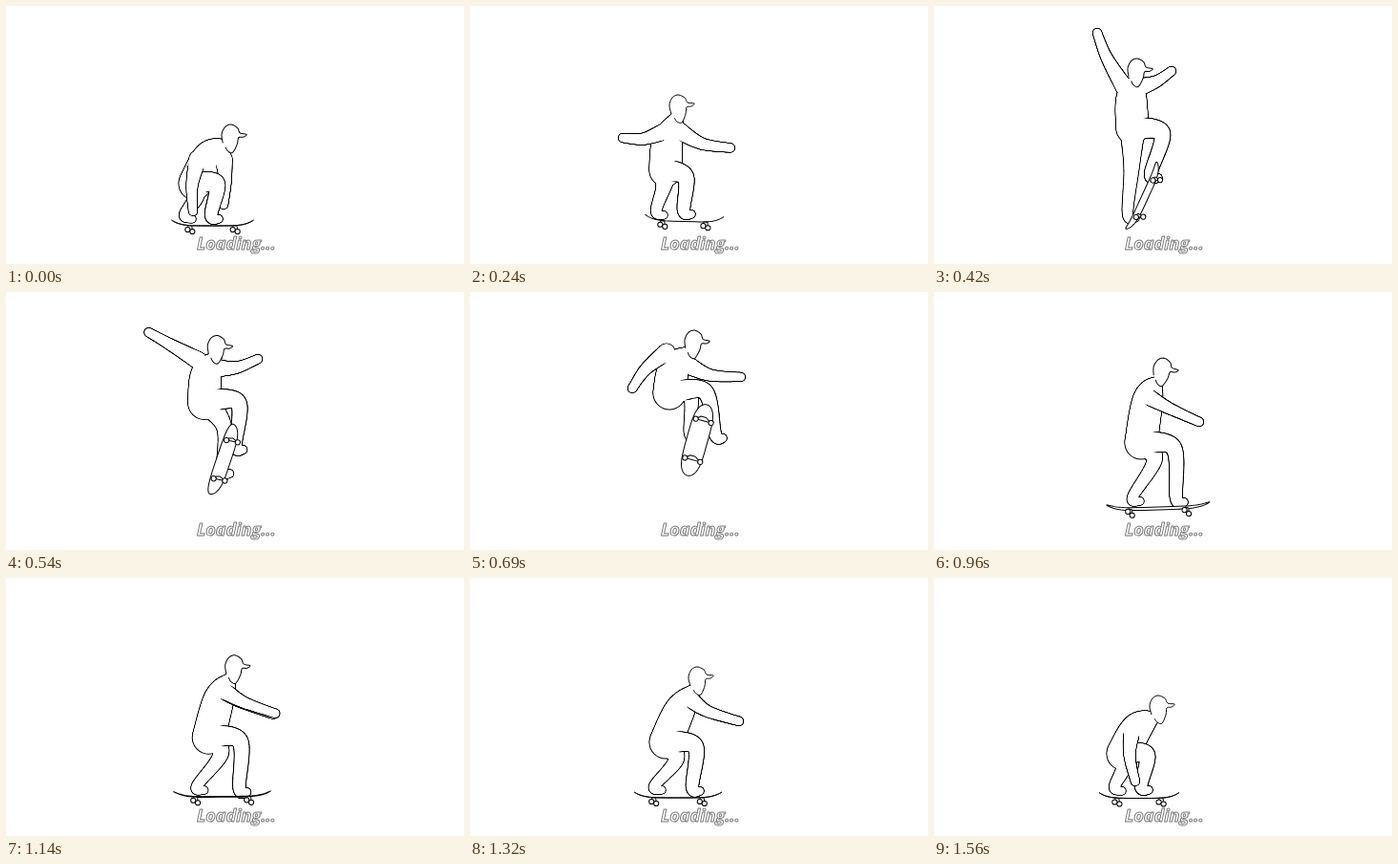
Animation, 480 px wide and 270 px high, one loop 1.59 s. Source, as an HTML page with a canvas:

```html
<!DOCTYPE html>
<html lang="en">
<head>
<meta charset="utf-8">
<title>Loading</title>
<style>
html, body { margin: 0; width: 100%; height: 100%; overflow: hidden; background: #fff; }
canvas { display: block; width: 480px; height: 270px; }
</style>
</head>
<body>
<canvas id="stage" width="480" height="270"></canvas>
<script>
const ctx = document.getElementById('stage').getContext('2d');
const LOOP = 1590, STEP = 30, TAU = Math.PI * 2;

// Half thickness at each joint; a near limb is outlined only past its seam.
const LIMBS = {
  torso: { radii: [6, 15.5, 17] },
  rearLeg: { radii: [13, 8, 5.5, 4] },
  frontArm: { radii: [9, 6, 4.5], seam: 0.2 },
  frontLeg: { radii: [12, 8.5, 6.5, 4], seam: 0.16 },
  backArm: { radii: [9, 6, 4.5], seam: 0.2 }
};
const FOOT = [0.45, 9];

// Joints as x, y. torso: neck, chest, hip. Arms: shoulder, elbow, hand.
// Legs: knee, ankle. head: x, y, tilt. board: x, y, angle, half length, half width.
const poses = [
  { time: 0, head: [235, 135, 0.08], torso: [230,146, 213,157, 198,186],
    backArm: [201,160, 195,188, 196,215], frontArm: [228,160, 230,184, 228,208],
    rearLeg: [198,202, 187,219], frontLeg: [221,186, 215,219], board: [216.5, 230, 0, 43, 0] },
  { time: 240, head: [218, 104, 0], torso: [217,116, 207,141, 205,172],
    backArm: [207,130, 182,139, 160,138], frontArm: [218,130, 243,144, 273,148.5],
    rearLeg: [203,189, 195,215], frontLeg: [226,179, 224,214], board: [224.5, 225.5, 0.03, 41, 0] },
  { time: 420, head: [212, 66, 0.1], torso: [213,78, 207,96, 208,128],
    backArm: [200,86, 181,54, 171,28], frontArm: [215,85, 233,79, 249,68],
    rearLeg: [207,170, 203,218], frontLeg: [239,133, 227,176], board: [221, 200, -1.14, 38.5, 3.5] },
  { time: 690, head: [234, 51, 0.14], torso: [230,63, 214,79, 209,106],
    backArm: [206,63, 184,81, 170,101], frontArm: [229,77, 252,87, 284,89],
    rearLeg: [231,108, 230,148], frontLeg: [246,104, 257,149], board: [238, 155, -1.3, 38.5, 11] },
  { time: 960, head: [239, 80, 0.22], torso: [232,95, 224,113, 217,158],
    backArm: [220,107, 245,121, 278,136], frontArm: [220,107, 245,121, 278,136],
    rearLeg: [231,176, 208,215], frontLeg: [251,163, 254,216], board: [235, 226.5, -0.03, 54, 1.5] },
  { time: 1320, head: [238, 104, 0], torso: [235,117, 220,138, 205,172],
    backArm: [229,125, 248,139, 282,150], frontArm: [229,125, 248,139, 282,150],
    rearLeg: [216,190, 193,218], frontLeg: [236,176, 233,219], board: [218, 230, 0, 46, 0] },
  { time: 1560, head: [235, 134, 0], torso: [230,146, 213,157, 198,184],
    backArm: [208,156, 205,185, 211,213], frontArm: [208,156, 205,185, 211,213],
    rearLeg: [199,198, 189,219], frontLeg: [223,185, 217,218], board: [215, 230.5, 0, 42, 0] }
];

// Turns joints into a root plus angle, length pairs, so that limbs swing.
const CUT = 1.7;
const toBones = p => p.map((v, i) => {
  if (i < 2) return v;
  const j = i & ~1, dx = p[j] - p[j - 2], dy = p[j + 1] - p[j - 1];
  return i % 2 ? Math.hypot(dx, dy) : (Math.atan2(dy, dx) + CUT + TAU) % TAU - CUT;
});

function toJoints(bones) {
  const joints = [[bones[0], bones[1]]];
  for (let i = 2; i < bones.length; i += 2) {
    const [x, y] = joints[joints.length - 1];
    joints.push([x + bones[i + 1] * Math.cos(bones[i]), y + bones[i + 1] * Math.sin(bones[i])]);
  }
  return joints;
}

for (const pose of poses) {
  const hip = pose.torso.slice(4);
  for (const leg of ['rearLeg', 'frontLeg']) pose[leg] = [...toBones([...hip, ...pose[leg]]), ...FOOT];
  for (const part of ['torso', 'backArm', 'frontArm']) pose[part] = toBones(pose[part]);
}

const slope = (part, i, a, b) => (poses[b][part][i] - poses[a][part][i]) / (poses[b].time - poses[a].time);

// Smooth slope at a pose that never overshoots its neighbours.
function tangent(part, i, k) {
  const last = poses.length - 1;
  if (k === 0) return slope(part, i, 0, 1);
  if (k === last) return slope(part, i, last - 1, last);
  const before = slope(part, i, k - 1, k), after = slope(part, i, k, k + 1);
  return before * after > 0 ? 2 * before * after / (before + after) : 0;
}

function partAt(part, t) {
  let k = poses.length - 2;
  while (k > 0 && poses[k].time > t) k--;
  const span = poses[k + 1].time - poses[k].time;
  const u = (t - poses[k].time) / span, v = 1 - u;
  return poses[k][part].map((a, i) =>
    a * v * v * (1 + 2 * u) + poses[k + 1][part][i] * u * u * (3 - 2 * u) +
    span * u * v * (tangent(part, i, k) * v - tangent(part, i, k + 1) * u));
}

// Catmull-Rom through a list of points of any dimension, u from 0 to 1.
function along(points, u) {
  const last = points.length - 1;
  const i = Math.min(last - 1, Math.floor(u * last)), s = u * last - i;
  const [a, b, c, d] = [-1, 0, 1, 2].map(o => points[Math.min(last, Math.max(0, i + o))]);
  return b.map((_, n) => b[n] + s / 2 * (c[n] - a[n] +
    s * (2 * a[n] - 5 * b[n] + 4 * c[n] - d[n] + s * (3 * (b[n] - c[n]) + d[n] - a[n]))));
}

function disc(x, y, r, color) {
  ctx.fillStyle = color;
  ctx.beginPath();
  ctx.arc(x, y, r, 0, TAU);
  ctx.fill();
}

function sweep(limb, color, grow, from = 0) {
  for (let u = from; u <= 1; u += 1 / 90) {
    const [x, y, r] = along(limb, u);
    disc(x, y, r + grow, color);
  }
}

function trace(points, closed) {
  ctx.beginPath();
  for (const [x, y] of points) ctx.lineTo(x, y);
  if (closed) ctx.closePath();
  ctx.fillStyle = '#fff';
  ctx.fill();
  ctx.stroke();
}

function drawBody(t) {
  const limbs = {};
  for (const [name, { radii }] of Object.entries(LIMBS)) {
    limbs[name] = toJoints(partAt(name, t)).map((joint, i) => [...joint, radii[i]]);
  }
  // One silhouette first, then the near limbs over it.
  for (const limb of Object.values(limbs)) sweep(limb, '#000', 0.5);
  for (const limb of Object.values(limbs)) sweep(limb, '#fff', -0.5);
  for (const [name, { seam }] of Object.entries(LIMBS)) {
    if (!seam) continue;
    sweep(limbs[name], '#000', 0.5, seam);
    sweep(limbs[name], '#fff', -0.5);
  }
}

// Nape, capped crown, brim, face and chin.
const PROFILE = [[-7, 9], [-9, 0], [-6, -8], [0, -11], [7, -8], [10, -3],
  [17, -2], [14, 1], [9, 2], [8, 9], [4, 18], [-1, 17], [-4, 13]];

function drawHead(t) {
  const [x, y, tilt] = partAt('head', t);
  ctx.save();
  ctx.translate(x, y);
  ctx.rotate(tilt);
  trace(Array.from({ length: 73 }, (_, i) => along(PROFILE, i / 72)));
  ctx.restore();
}

function drawBoard(t) {
  const [x, y, angle, half, width] = partAt('board', t);
  const flat = 1 - width / 11;
  ctx.save();
  ctx.translate(x, y);
  ctx.rotate(angle);
  trace(Array.from({ length: 81 }, (_, i) => {
    const a = i / 80 * TAU, u = Math.sign(Math.cos(a)) * Math.sqrt(Math.abs(Math.cos(a)));
    return [half * u, width * Math.sin(a) - 6 * flat * Math.abs(u) ** 5];
  }), true);
  for (const side of [-1, 1]) {
    const mount = side * half * 0.55, drop = 1 + 4 * flat, spread = width * 0.75 + flat;
    const wheels = [[mount - 2.5 * flat, drop - spread], [mount + 2.5 * flat, drop + spread]];
    const [a, b] = wheels, lift = 4 * (1 - flat);
    trace([a, [mount - 2 * flat + lift, -spread / 3], [mount + 2 * flat + lift, spread / 3], b], true);
    for (const [wx, wy] of wheels) {
      disc(wx, wy, 3.1, '#000');
      disc(wx, wy, 2.1, '#fff');
    }
  }
  ctx.restore();
}

function drawCaption() {
  ctx.save();
  ctx.font = 'italic 700 18px "Open Sans", "Noto Sans", sans-serif';
  ctx.strokeStyle = '#777';
  ctx.strokeText('Loading...', 200, 255);
  ctx.restore();
}

function draw(t) {
  ctx.fillStyle = '#fff';
  ctx.fillRect(0, 0, 480, 270);
  ctx.lineJoin = 'round';
  ctx.strokeStyle = '#000';
  ctx.lineWidth = 1;
  drawBody(t);
  drawHead(t);
  drawBoard(t);
  drawCaption();
}

function tick(now) {
  draw(Math.floor(now % LOOP / STEP) * STEP);
  requestAnimationFrame(tick);
}
draw(0);
requestAnimationFrame(tick);
</script>
</body>
</html>
```
